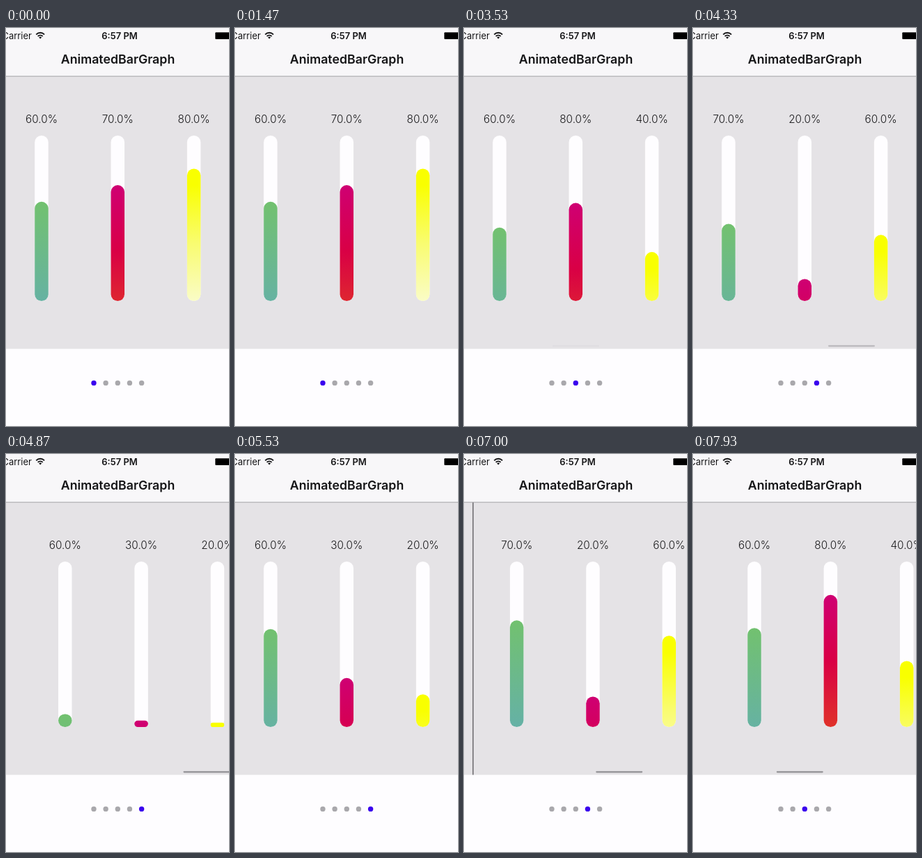
An HTML page for the animation above (8 s loop, 320 by 570 pixels).

```html
<!DOCTYPE html>
<html lang="en">
<head>
<meta charset="utf-8">
<title>Animated bar graph</title>
<style>
  html, body { margin: 0; width: 100%; height: 100%; overflow: hidden; background: #fefdff; }
  svg { display: block; width: 100vw; height: 100vh; }
  text { font-family: Inter, Roboto, sans-serif; fill: #151517; }
  .label { font-size: 15.3px; font-weight: 300; text-anchor: middle; fill: #1c1c1e; }
</style>
</head>
<body>
<svg viewBox="0 0 320 570">
  <defs>
    <linearGradient id="g0" gradientUnits="userSpaceOnUse" x1="0" y1="0" x2="0" y2="237">
      <stop stop-color="#72c16f"/><stop offset="1" stop-color="#5ea8c4"/>
    </linearGradient>
    <linearGradient id="g1" gradientUnits="userSpaceOnUse" x1="0" y1="0" x2="0" y2="237">
      <stop stop-color="#cf0073"/><stop offset=".4" stop-color="#d90045"/>
      <stop offset=".7" stop-color="#de2630"/><stop offset="1" stop-color="#e4481c"/>
    </linearGradient>
    <linearGradient id="g2" gradientUnits="userSpaceOnUse" x1="0" y1="0" x2="0" y2="237">
      <stop offset=".1" stop-color="#f9ff00"/><stop offset=".45" stop-color="#f9fc70"/>
      <stop offset=".8" stop-color="#fafcc6"/><stop offset="1" stop-color="#fbfde0"/>
    </linearGradient>
    <clipPath id="panel"><rect y="69" width="320" height="390.5"/></clipPath>
  </defs>

  <rect width="320" height="570" fill="#fefdff"/>
  <rect y="69" width="320" height="390.5" fill="#e5e3e6"/>
  <g clip-path="url(#panel)">
    <g id="pages"></g>
    <rect id="thumb" y="454.2" width="67" height="2.2" rx="1.1" fill="#929195"/>
  </g>

  <rect width="320" height="69" fill="#f8f7f9"/>
  <rect y="68.6" width="320" height="1" fill="#a3a2a5"/>
  <text x="37" y="16" font-size="13" text-anchor="end">Carrier</text>
  <g fill="none" stroke="#151517" stroke-width="1.9">
    <path d="M43.3 9.3a8.2 8.2 0 0 1 11.8 0M45.7 11.8a4.9 4.9 0 0 1 7 0"/>
    <path d="M49.2 15.6l-2-2.1a2.8 2.8 0 0 1 4 0z" fill="#151517" stroke="none"/>
  </g>
  <text x="163" y="16" font-size="13" font-weight="600" text-anchor="middle">6:57 PM</text>
  <rect x="300.3" y="6.3" width="30" height="9.6" rx="1" fill="#000"/>
  <text x="160.5" y="51.2" font-size="17.75" font-weight="600" text-anchor="middle">AnimatedBarGraph</text>
  <g id="dots"></g>
</svg>
<script>
const LOOP = 8000, STEP = 1000 / 15;
const PAGE = 345, TOP = 154, TRACK = 237, BAR = 19.5;
const SCROLL = 380, GROW = 1000;
const values = [[60, 70, 80], [30, 50, 90], [60, 80, 40], [70, 20, 60], [60, 30, 20]];
// swipes: start time, page left, page entered
const swipes = [
  [1940, 0, 1], [2886, 1, 2], [3735, 2, 3], [4615, 3, 4],
  [6198, 4, 3], [6968, 3, 2], [7891, 2, 1]
];

const $ = id => document.getElementById(id);
const clamp = x => Math.max(0, Math.min(1, x));

function add(parent, tag, attrs, text) {
  const el = document.createElementNS('http://www.w3.org/2000/svg', tag);
  for (const k in attrs) el.setAttribute(k, attrs[k]);
  if (text) el.textContent = text;
  return parent.appendChild(el);
}

const pages = values.map((row, n) => {
  const group = add($('pages'), 'g', {});
  // hairline gap between the third and fourth page
  if (n === 3) add(group, 'rect', { x: -12.2, y: 69, width: 1, height: 391, fill: '#2c2b2e' });
  const bars = row.map((value, i) => {
    const cx = 51 + i * 109.3, x = cx - BAR / 2;
    add(group, 'text', { x: cx, y: 135.5, class: 'label' }, value.toFixed(1) + '%');
    add(group, 'rect', { x, y: TOP, width: BAR, height: TRACK, rx: BAR / 2, fill: '#fefdff' });
    const fill = add(group, 'rect', { x, width: BAR, fill: `url(#g${i})` });
    return { value, fill };
  });
  return { group, bars };
});

const dots = values.map((_, i) => add($('dots'), 'circle', { cx: 126 + i * 17.15, cy: 508.4, r: 3.7 }));

// cubic-bezier(.42, 0, .58, 1)
function easeInOut(x) {
  let lo = 0, hi = 1, s = .5;
  for (let i = 0; i < 20; i++) {
    s = (lo + hi) / 2;
    const bx = 1.26 * s * (1 - s) ** 2 + 1.74 * s * s * (1 - s) + s ** 3;
    if (bx < x) lo = s; else hi = s;
  }
  return s * s * (3 - 2 * s);
}

const swipeEase = u => 1 - (1 - u ** 1.5) ** 3;

function draw(t) {
  let pos = 0, last = -LOOP;
  const shown = values.map(() => -LOOP);
  for (const [start, from, to] of swipes) {
    if (t < start) break;
    pos = from + (to - from) * swipeEase(clamp((t - start) / SCROLL));
    shown[to] = last = start;
  }

  pages.forEach(({ group, bars }, n) => {
    const dx = (n - pos) * PAGE;
    const visible = Math.abs(dx) < PAGE;
    group.setAttribute('display', visible ? 'inline' : 'none');
    if (!visible) return;
    group.setAttribute('transform', `translate(${dx.toFixed(2)} 0)`);
    const grown = easeInOut(clamp((t - shown[n]) / GROW));
    for (const { value, fill } of bars) {
      const h = TRACK * value / 100 * grown;
      fill.setAttribute('transform', `translate(0 ${TOP + TRACK - h})`);
      fill.setAttribute('height', h);
      fill.setAttribute('rx', Math.min(BAR, h) / 2);
    }
  });

  $('thumb').setAttribute('x', -7 + 67 * pos);
  $('thumb').setAttribute('opacity', clamp((655 - (t - last)) / 110));
  dots.forEach((dot, i) => dot.setAttribute('fill', i === Math.round(pos) ? '#3a00ee' : '#a9a8ac'));
}

const begin = performance.now();
function tick() {
  // the picture holds at 15 steps per second
  const t = (performance.now() - begin) % LOOP;
  draw(Math.floor((t + 5) / STEP) * STEP % LOOP);
  requestAnimationFrame(tick);
}
tick();
</script>
</body>
</html>
```
